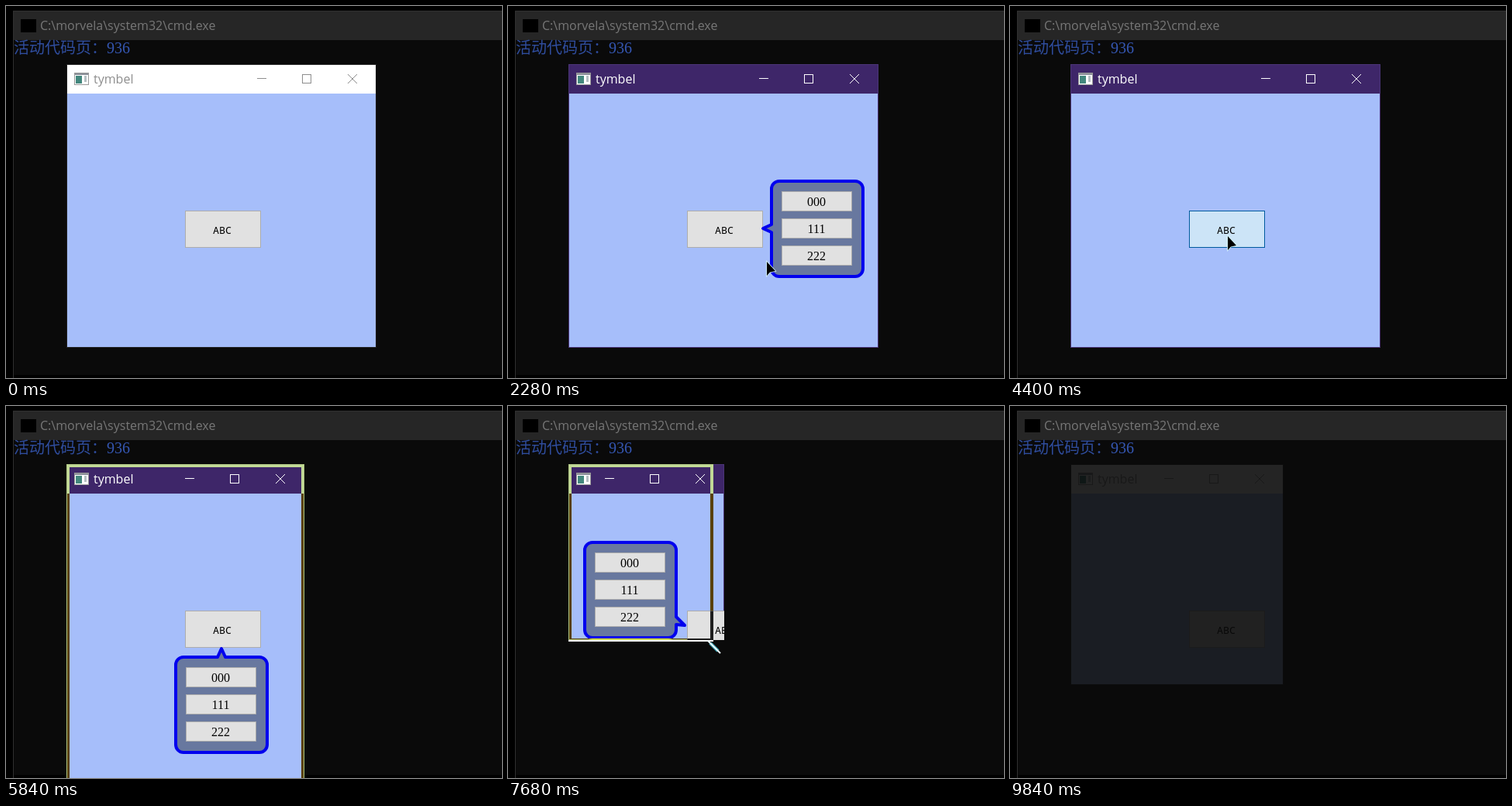
Write an HTML page with a canvas that moves like this. It is 640 px wide and 480 px high and loops after 9880 ms.

```html
<!DOCTYPE html>
<html lang="zh">
<head>
<meta charset="utf-8">
<style>
html, body { margin: 0; width: 100%; height: 100%; overflow: hidden; background: #000; }
canvas { display: block; }
</style>
</head>
<body>
<canvas id="stage" width="640" height="480"></canvas>
<script>
const ctx = document.getElementById('stage').getContext('2d');
const LOOP = 9880, STEP = 40;
const LEFT = 78, TOP = 75, CLIENT_TOP = 113;
const BTN = { x: 231, y: 264, w: 98, h: 48 };
const UI = '16px "Open Sans", sans-serif';
const DRAG_START = 5080, DRAG_END = 8360, BLUR = 8880;

// Times at which the popup opens or closes
const TOGGLES = [760, 2480, 2800, 3800, 4480, 8920];

// time, right edge, bottom edge of the dragged frame
const SIZES = [
  [5080, 478, 441], [5600, 385, 500], [5840, 385, 500], [6200, 400, 470],
  [6800, 395, 306], [6920, 395, 306], [7160, 462, 300], [7640, 279, 302],
  [7680, 265, 304], [7880, 240, 306], [8360, 353, 360]
];

// time, x, y of the pointer tip
const POINTER = [
  [80, 440, 424], [480, 290, 300], [1000, 290, 300], [1360, 441, 393],
  [1640, 488, 450], [2000, 448, 410], [2400, 285, 296], [2800, 290, 292],
  [3000, 293, 287], [3320, 400, 416], [3720, 290, 300], [4320, 281, 297],
  [4480, 281, 297], [4760, 514, 450], [5040, 479, 448], [8360, 354, 367],
  [8640, 438, 395]
];

function along(keys, t) {
  const i = keys.findIndex(k => k[0] > t);
  if (i < 0) return keys[keys.length - 1].slice(1);
  if (i === 0) return keys[0].slice(1);
  const a = keys[i - 1], b = keys[i], p = (t - a[0]) / (b[0] - a[0]);
  return [1, 2].map(n => Math.round(a[n] + (b[n] - a[n]) * p));
}

function rect(color, x, y, w, h) {
  ctx.fillStyle = color;
  ctx.fillRect(x, y, w, h);
}

function text(str, x, y, font, color, align = 'left') {
  ctx.font = font;
  ctx.fillStyle = color;
  ctx.textAlign = align;
  ctx.fillText(str, x, y);
}

function line(color, width, ...pts) {
  ctx.strokeStyle = color;
  ctx.lineWidth = width;
  ctx.beginPath();
  for (let i = 0; i < pts.length; i += 4) {
    ctx.moveTo(pts[i], pts[i + 1]);
    ctx.lineTo(pts[i + 2], pts[i + 3]);
  }
  ctx.stroke();
}

function box(x, y, w, h, fill, edge) {
  rect(edge, x, y, w, h);
  rect(fill, x + 1, y + 1, w - 2, h - 2);
}

function drawConsole() {
  rect('#000', 0, 0, 640, 480);
  rect('#303030', 9, 6, 631, 470);
  rect('#262626', 10, 7, 630, 37);
  rect('#0a0a0a', 10, 44, 630, 432);
  rect('#303030', 9, 476, 1, 4);
  rect('#000', 19, 17, 20, 17);
  text('C:\\morvela\\system32\\cmd.exe', 44, 31, UI, '#777');
  text('活动代码页：', 10, 61, '300 20px "Noto Sans CJK SC", "Noto Sans CJK", sans-serif', '#2f4d9e');
  text('936', 130, 61, '20px "Liberation Serif", serif', '#3557b3');
}

function drawTitle(R, active) {
  const ink = active ? '#fff' : '#8e8e8e';
  rect(active ? '#3e2669' : '#fff', LEFT + 1, TOP + 1, R - LEFT - 2, 37);
  box(88, 86, 19, 16, '#fff', '#999');
  rect('#8a8f98', 89, 87, 17, 2);
  rect('#43877d', 90, 90, 8, 10);
  rect('#b5bfc2', 101, 90, 3, 8);
  if (R > 335) text('tymbel', 113, 100, UI, ink);
  line(ink, 1, R - 154, 93.5, R - 142, 93.5);
  ctx.strokeRect(R - 95.5, 88.5, 11, 11);
  line(ink, 1, R - 37, 88, R - 25, 100, R - 37, 100, R - 25, 88);
}

function drawButton(hover, pressed) {
  const [fill, edge] = pressed ? ['#cce4f7', '#005a9e']
    : hover ? ['#e5f1fb', '#0d7ed0'] : ['#e1e1e1', '#adadad'];
  box(BTN.x, BTN.y, BTN.w, BTN.h, fill, edge);
  text('ABC', 279, 294, '13.33px "Noto Sans Mono", monospace', '#000', 'center');
}

// The popup goes right of the button if it fits, else below, else left.
function drawPopup(R, B) {
  const side = R >= 460 ? 'right' : B >= 450 ? 'below' : 'left';
  const x = { right: 338, below: 217, left: 97 }[side];
  const y = side === 'below' ? 322 : Math.min(224, B - 128);
  const l = x + 2, t = y + 2, r = x + 120, b = y + 125, q = 10;
  const tip = Math.min(287, (BTN.y + B) / 2), base = Math.min(287, y + 103);

  ctx.beginPath();
  ctx.moveTo(l + q, t);
  if (side === 'below') {
    ctx.lineTo(273, t);
    ctx.lineTo(278, 313);
    ctx.lineTo(283, t);
  }
  ctx.arcTo(r, t, r, b, q);
  if (side === 'left') {
    ctx.lineTo(r, base - 5);
    ctx.lineTo(228, tip);
    ctx.lineTo(r, base + 5);
  }
  ctx.arcTo(r, b, l, b, q);
  ctx.arcTo(l, b, l, t, q);
  if (side === 'right') {
    ctx.lineTo(l, base + 5);
    ctx.lineTo(329, tip);
    ctx.lineTo(l, base - 5);
  }
  ctx.arcTo(l, t, r, t, q);
  ctx.closePath();
  ctx.fillStyle = '#68789f';
  ctx.fill();
  ctx.strokeStyle = '#0000ee';
  ctx.lineWidth = 4;
  ctx.lineJoin = 'round';
  ctx.stroke();

  ['000', '111', '222'].forEach((label, i) => {
    const top = y + 15 + i * 35;
    box(x + 15, top, 91, 26, '#e1e1e1', '#adadad');
    text(label, x + 60, top + 19, '16px "Liberation Serif", serif', '#000', 'center');
  });
}

// Inverts a 4 px outline while the window is being resized
function drawFrame(R, B) {
  ctx.globalCompositeOperation = 'difference';
  rect('#fff', LEFT, TOP, R - LEFT, 4);
  rect('#fff', LEFT, B - 4, R - LEFT, 4);
  rect('#fff', LEFT, TOP + 4, 4, B - TOP - 8);
  rect('#fff', R - 4, TOP + 4, 4, B - TOP - 8);
  ctx.globalCompositeOperation = 'source-over';
}

function drawArrow(x, y) {
  ctx.beginPath();
  [[0, 0], [0, 18], [4, 13.5], [11, 12]].forEach(p => ctx.lineTo(x + p[0], y + p[1]));
  ctx.closePath();
  ctx.strokeStyle = '#d5f6fa';
  ctx.lineWidth = 1.6;
  ctx.stroke();
  ctx.fillStyle = '#000';
  ctx.fill();
}

function drawSizer(x, y) {
  line('#3b9fb0', 4.5, x - 5, y - 5, x + 5, y + 5);
  line('#effdff', 2, x - 8, y - 8, x + 8, y + 8);
}

function draw(t) {
  const closing = t >= 9840, active = t >= 640 && t < BLUR;
  const dragging = t >= DRAG_START && t < DRAG_END;
  const frame = along(SIZES, t);
  const [R, B] = along(SIZES, dragging ? t - STEP : t);
  const [px, py] = dragging ? [frame[0] + 1, frame[1] + 7] : along(POINTER, t);
  const shown = t >= 80 && t < 9040;
  const hover = shown && t < 5040 && px >= BTN.x && px < BTN.x + BTN.w &&
    py >= BTN.y && py < BTN.y + BTN.h;
  const pressed = hover && TOGGLES.some(s => s > t && s - t <= 120);
  const open = TOGGLES.filter(s => s <= t).length % 2;

  drawConsole();

  ctx.save();
  ctx.beginPath();
  ctx.rect(LEFT, TOP, R - LEFT, B - TOP);
  ctx.clip();
  rect(active ? '#4b3577' : '#222', LEFT, TOP, R - LEFT, B - TOP);
  drawTitle(R, active);
  rect('#a6befa', LEFT + 1, CLIENT_TOP, R - LEFT - 2, B - CLIENT_TOP - 1);
  drawButton(hover, pressed);
  if (open) drawPopup(R, B);
  if (closing) rect('rgba(10,10,10,.89)', LEFT, TOP, R - LEFT, B - TOP);
  ctx.restore();

  if (dragging) drawFrame(...frame);
  if (shown) (t >= 5040 && t < 8400 ? drawSizer : drawArrow)(px, py);
}

const start = performance.now();
function tick() {
  const t = (performance.now() - start) % LOOP;
  draw(Math.floor(t / STEP) * STEP);
  requestAnimationFrame(tick);
}
tick();
</script>
</body>
</html>
```
